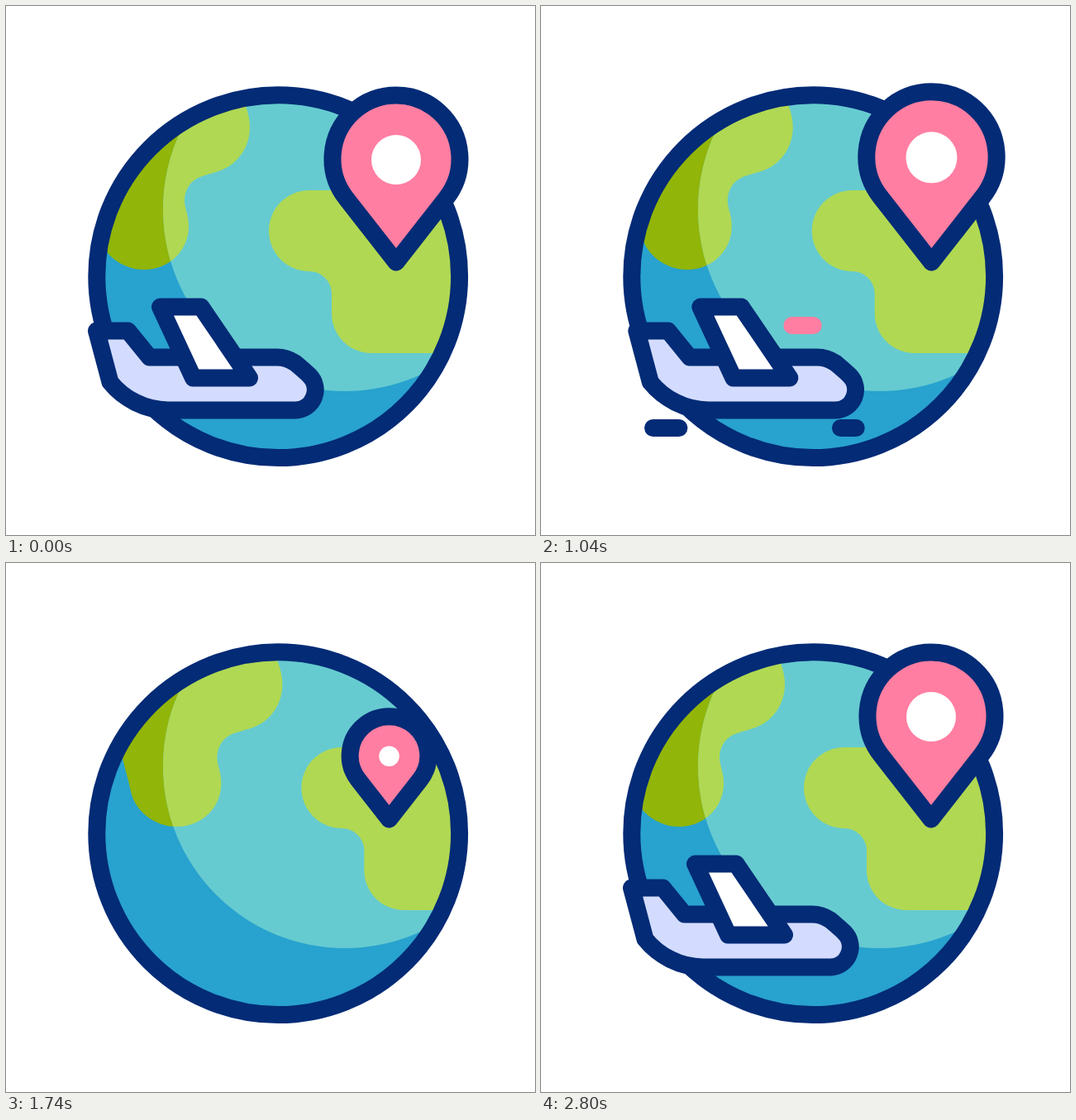
Write an HTML page that moves like this. It is 640 px wide and 640 px high and loops after 2820 ms.

```html
<!DOCTYPE html>
<html lang="en">
<head>
<meta charset="utf-8">
<title>Travel the globe</title>
<style>
  html, body { margin: 0; width: 100%; height: 100%; overflow: hidden; background: #fff; }
  svg { display: block; }
  .line { stroke: #032b76; stroke-width: 21; stroke-linecap: round; stroke-linejoin: round; }
</style>
</head>
<body>
<svg width="640" height="640" viewBox="0 0 640 640">
  <defs>
    <clipPath id="disc"><circle cx="329" cy="327" r="214"/></clipPath>
    <clipPath id="lit"><circle cx="410" cy="246" r="220"/></clipPath>
    <g id="lands">
      <path d="M280 100L290 121C293 129 295 138 295 147C295 170 281 190 262 198C252 202 240 204 232 208C222 213 216 224 216 235C216 245 221 252 221 267C221 296 197 319 167 319C142 319 118 302 112 278C106 250 95 220 95 190C95 168 101 147 109 131L125 100Z"/>
      <path d="M367 223H615C655 223 681 226 681 252L679 380C679 412 650 420 590 420H442A48 48 0 0 1 394 372V348A27 27 0 0 0 367 321A49 49 0 0 1 367 223Z"/>
      <path d="M-82 488C-82 466 -56 449 -21 449C-1 449 5 457 5 480C5 500 3 508 -19 511C-33 514 -46 515 -56 516C-71 512 -82 502 -82 488Z"/>
    </g>
    <g id="map">
      <use href="#lands"/>
      <use href="#lands" x="-660"/>
    </g>
  </defs>

  <g clip-path="url(#disc)">
    <rect width="640" height="640" fill="#28a2ce"/>
    <use class="map" href="#map" fill="#91b508"/>
    <g clip-path="url(#lit)">
      <rect width="640" height="640" fill="#66cbd0"/>
      <use class="map" href="#map" fill="#b0d853"/>
    </g>
  </g>
  <circle class="line" cx="329.2" cy="327.2" r="219.4" fill="none"/>

  <path id="pin" class="line" fill="#ff7ea1" vector-effect="non-scaling-stroke"
    d="M0 0L-60.7 -77.6A77 77 0 1 1 60.7 -77.6Z"/>
  <circle id="hole" fill="#fff"/>

  <line class="line dash" data-from="190" data-to="22.5" y1="510.5" y2="510.5"/>
  <line class="line dash" data-from="395" data-to="295" y1="510.5" y2="510.5"/>
  <line class="line dash" data-from="348" data-to="212" y1="386.5" y2="386.5" style="stroke:#ff7ea1"/>

  <g id="plane" class="line">
    <path fill="#d3dcff" d="M109.500 393H147.500L173.500 425H328C337 425 344 428 350 432C356 437 362 442 367 447A24.600 24.600 0 0 1 350 489H196C168 489 142 475 126 455Z"/>
    <path fill="#fff" d="M186.500 364H236L294.500 450H226.500Z"/>
  </g>
</svg>
<script>
const LOOP = 2820;
const PERIOD = 660;
const $ = id => document.getElementById(id);
const maps = document.querySelectorAll('.map');
const dashes = document.querySelectorAll('.dash');

const part = (t, start, length) => Math.min(1, Math.max(0, (t - start) / length));
const ease = (t, start, length) => (1 - Math.cos(Math.PI * part(t, start, length))) / 2;

// One turn, running past its end and settling back.
const spin = t => (PERIOD + 45) * ease(t, 996, 600) - 45 * ease(t, 1640, 440);

// Swell, shrink, grow past full size, settle.
const pinScale = t => 1 + 0.06 * ease(t, 1000, 100) - 0.45 * ease(t, 1100, 305)
  + 0.45 * part(t, 1690, 490) ** 2 - 0.06 * ease(t, 2180, 160);

// Draw back and speed off to the right, then glide in from the left.
const planeX = t => t < 1650
  ? -7 * ease(t, 620, 340) + 600 * part(t, 964, 517) ** 2
  : -400 * ((1 - part(t, 1650, 706)) * 706 / 516) ** 3;

const planeY = t => -Math.sin(Math.PI * part(t, 0, 800));

function draw(t) {
  maps.forEach(m => m.setAttribute('transform', `translate(${spin(t)})`));

  const s = pinScale(t), x = 472 - 22 * (1 - s);
  $('pin').setAttribute('transform', `translate(${x} 310) scale(${s})`);
  $('hole').setAttribute('cx', x);
  $('hole').setAttribute('cy', 310 - 124 * s);
  $('hole').setAttribute('r', 46 * s - 16);

  const head = ease(t, 863, 461), tail = ease(t, 945, 396);
  dashes.forEach(line => {
    const from = +line.dataset.from, run = line.dataset.to - from;
    line.setAttribute('x1', from + run * head);
    line.setAttribute('x2', from + run * tail);
    line.setAttribute('visibility', head > 0 && tail < 1 ? 'visible' : 'hidden');
  });

  $('plane').setAttribute('transform', `translate(${planeX(t)} ${planeY(t)})`);
}

const start = performance.now();
function tick() {
  draw((performance.now() - start) % LOOP);
  requestAnimationFrame(tick);
}
draw(0);
requestAnimationFrame(tick);
</script>
</body>
</html>
```
